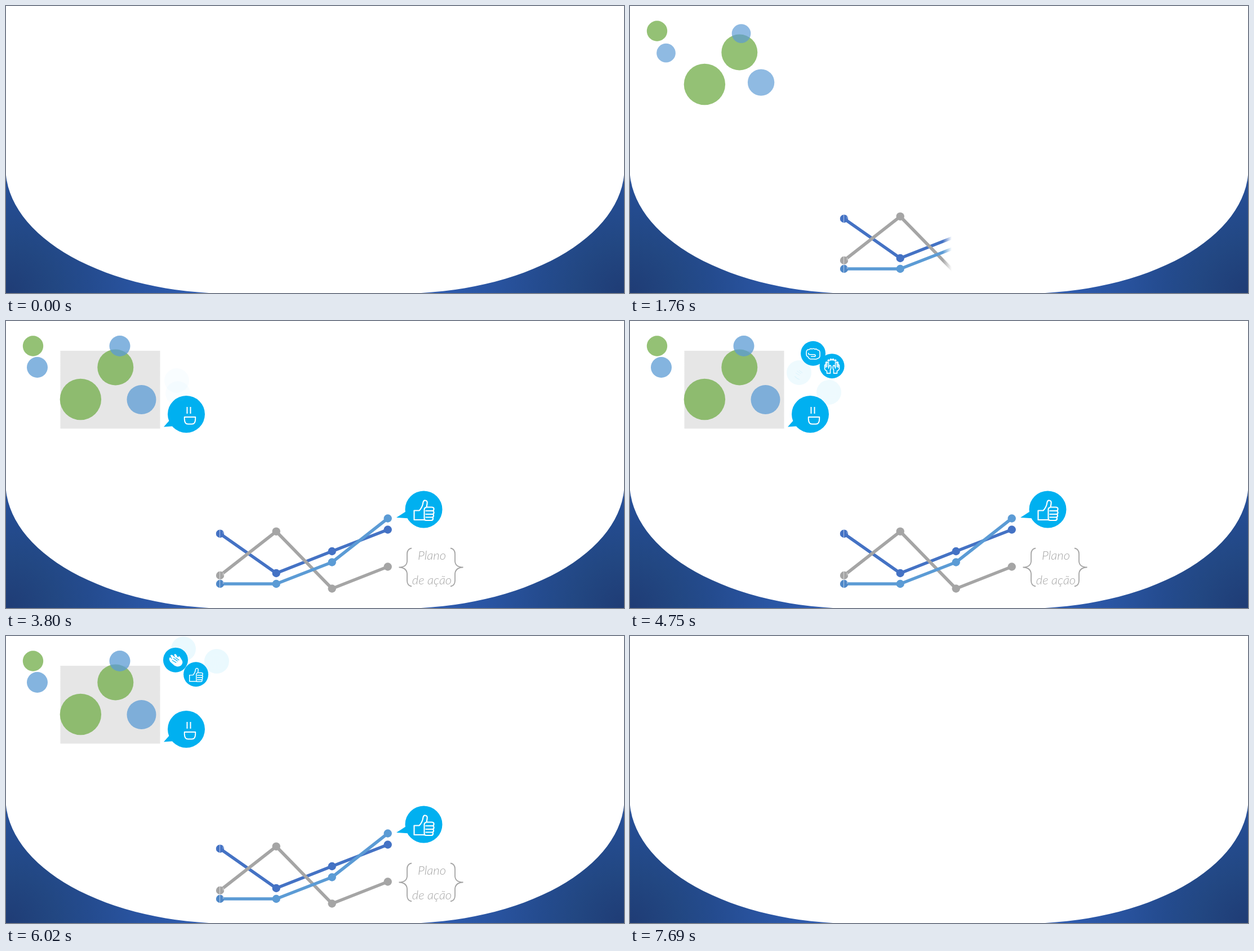
These frames come from a looping animation (1097x511 px, 8400 ms). An HTML page with a canvas:

```html
<!DOCTYPE html>
<html lang="pt">
<head>
<meta charset="utf-8">
<title>Plano de ação</title>
<style>
html, body { margin: 0; width: 100%; height: 100%; overflow: hidden; background: #fff; }
canvas { display: block; }
</style>
</head>
<body>
<canvas id="stage" width="1097" height="511"></canvas>
<script>
const W = 1097, H = 511, LOOP = 8400, STEP = 470;
const CYAN = '#00b0f0', GREY = '#a5a5a5', BLUE = '#4472c4', SKY = '#5b9bd5', GREEN = '#70ad47';
const ctx = document.getElementById('stage').getContext('2d');
const layer = document.createElement('canvas');
layer.width = W;
layer.height = H;
const lx = layer.getContext('2d');

const clamp = v => Math.min(1, Math.max(0, v));
const ramp = (t, start, end) => clamp((t - start) / (end - start));
const easeInOut = u => (1 - Math.cos(Math.PI * u)) / 2;

function disc(c, x, y, r, color) {
  c.fillStyle = color;
  c.beginPath();
  c.arc(x, y, r, 0, 7);
  c.fill();
}

function withState(fn) {
  ctx.save();
  fn();
  ctx.restore();
}

// Scale around a point and fade at the same rate
function zoomed(x, y, s, fn) {
  if (s <= 0) return;
  withState(() => {
    ctx.translate(x, y);
    ctx.scale(s, s);
    ctx.translate(-x, -y);
    ctx.globalAlpha *= s;
    fn();
  });
}

// ---- Background corners
function corner() {
  const g = ctx.createRadialGradient(0, H, 0, 0, H, 350);
  g.addColorStop(0, '#1f3c75');
  g.addColorStop(0.25, '#224782');
  g.addColorStop(0.42, '#244b8e');
  g.addColorStop(0.7, '#2a55a3');
  g.addColorStop(1, '#2e5cb1');
  ctx.fillStyle = g;
  ctx.beginPath();
  ctx.moveTo(-1, H + 1);
  ctx.lineTo(-0.6, 288.8);
  ctx.ellipse(399.4, 288.8, 400, 223.2, 0, Math.PI, Math.PI / 2, true);
  ctx.lineTo(399.4, H + 1);
  ctx.fill();
}

function background() {
  ctx.fillStyle = '#fff';
  ctx.fillRect(0, 0, W, H);
  corner();
  withState(() => {
    ctx.translate(W, 0);
    ctx.scale(-1, 1);
    corner();
  });
}

// ---- Bubble chart
const greens = [[48, 44.5, 18.2], [194.3, 82.5, 32], [132.4, 139.5, 36.7]];
const blues = [[55.5, 82.5, 18.5], [202, 44.5, 18.5], [240.5, 140, 26]];

function bubbles(list, color, cx, cy, s) {
  zoomed(cx, cy, s, () => {
    ctx.globalAlpha *= 0.75;
    for (const [x, y, r] of list) disc(ctx, x, y, r, color);
  });
}

// Grey panel opening from its middle line, with soft edges
function panel(p) {
  if (p <= 0) return;
  const soft = 9, mid = 122.3, h = p * (69.3 + soft);
  const g = ctx.createLinearGradient(0, mid - h, 0, mid + h);
  const k = Math.min(0.5, soft / (2 * h));
  g.addColorStop(0, 'rgba(230,230,230,0)');
  g.addColorStop(k, '#e6e6e6');
  g.addColorStop(1 - k, '#e6e6e6');
  g.addColorStop(1, 'rgba(230,230,230,0)');
  ctx.fillStyle = g;
  ctx.fillRect(96.5, 53, 177, 138.6);
}

// ---- Line chart
const cols = [380, 479.7, 578.7, 677.7];
const series = [
  [BLUE, [378.7, 449, 410, 371.5]],
  [GREY, [453, 374.7, 476.5, 437.5]],
  [SKY, [468, 468, 429.5, 351.5]]
];
const wipeFrom = [373, 380, 480, 579], wipeTo = [373, 387, 487, 586, 686], SOFT = 16;

function lineChart(t) {
  const step = Math.min(3, Math.floor((t - STEP) / STEP));
  if (step < 0) return;
  lx.globalCompositeOperation = 'source-over';
  lx.clearRect(0, 0, W, H);
  lx.lineWidth = 5.6;
  lx.lineJoin = 'round';
  for (const [color, ys] of series) {
    lx.strokeStyle = color;
    lx.beginPath();
    ys.forEach((y, i) => lx.lineTo(cols[i], y));
    lx.stroke();
    ys.forEach((y, i) => disc(lx, cols[i], y, 7.2, i === 0 && color === SKY ? '#4f88c8' : color));
    // seam in the first marker
    lx.fillStyle = 'rgba(255,255,255,.6)';
    lx.fillRect(379, ys[0] - 7, 1, 14);
    lx.fillStyle = 'rgba(255,255,255,.3)';
    lx.fillRect(384.5, ys[0] - 5, 2.5, 5);
  }
  const p = ramp(t, STEP * (step + 1), STEP * (step + 2));
  const prev = wipeTo[step], span = 200;
  const lead = wipeFrom[step] + p * (wipeTo[step + 1] - wipeFrom[step] + SOFT);
  const g = lx.createLinearGradient(prev, 0, prev + span, 0);
  const solid = Math.max(prev, lead - SOFT), end = Math.max(prev, lead);
  g.addColorStop(0, '#000');
  g.addColorStop((solid - prev) / span, `rgba(0,0,0,${clamp((lead - prev) / SOFT)})`);
  g.addColorStop((end - prev) / span, 'rgba(0,0,0,0)');
  lx.globalCompositeOperation = 'destination-in';
  lx.fillStyle = g;
  lx.fillRect(0, 0, W, H);
  ctx.drawImage(layer, 0, 0);
}

// ---- White icons, drawn around 0,0
const thumbPath = new Path2D('M-17 2H-8Q-2-4-1-13Q0-16.500 3-16Q7-15.500 6-10L5-4H14Q18-4 18-1' +
  'Q18 2.500 15 2.500Q18.500 3 18 6Q18 8.500 15 8.500Q18 9 17.500 11.500Q17.500 14 14 14' +
  'Q17 14.500 16.500 17Q16 19.500 13 19.500H4L0 18.500H-17Z' +
  'M5-4Q1-3 1 0V16Q1 19 4 19.500M15 2.500H3M15 8.500H3M14 14H3');
const fistPath = new Path2D('M-12-2Q-12-7-7-7Q-5-9-2-8Q1-9 3-7.500Q6-8.500 8-6Q12-6 12-1V4Q12 8 8 9' +
  'Q5 11 2 10H-5Q-8 9-9 6Q-12 5-12 1ZM-8-1Q-9 2-6 2H2Q4 2 4 4Q4 5.500 2 5.500H-4');
const armPath = new Path2D('M-3 13V7Q-1 4-2 0Q-3-2-5 0L-6 4V-6Q-8-8-9-5V-7Q-11-8-11-5V-2' +
  'Q-13-3-13 0V5Q-12 8-9 9V13ZM-9-5V2M-11-2V3');
const clapPath = new Path2D('M-10 1Q-12-6-8-7L-5-2-7-10Q-4-12-2-8L0-4 0-10Q3-12 4-7L5-3Q8-7 9-3' +
  'L11 4Q12 9 7 12Q1 14-4 10Z');
const clapLines = new Path2D('M-6-1L0 5M-3-4L3 3M1-4L6 2M-9 4Q-7 9-2 12');
const cupPath = new Path2D('M1.500-13V-1M7.500-13V-1M-3.200 5H16.200V9Q16 17.500 10 17.500H3Q-3 17.500-3.200 9Z');

function ink(path, width) {
  ctx.strokeStyle = '#fff';
  ctx.lineWidth = width;
  ctx.lineJoin = 'round';
  ctx.stroke(path);
}

const icons = {
  fist() { ink(fistPath, 1.6); },
  hands() {
    for (const side of [1, -1]) {
      withState(() => { ctx.scale(side, 1); ink(armPath, 1.6); });
    }
    for (const x of [-6, -2, 2, 6]) disc(ctx, x, -12 + Math.abs(x) / 3, 2, '#fff');
  },
  clap() {
    withState(() => {
      ctx.rotate(-0.25);
      ctx.fillStyle = '#fff';
      ctx.fill(clapPath);
      ctx.strokeStyle = CYAN;
      ctx.lineWidth = 1.2;
      ctx.stroke(clapLines);
    });
  },
  thumb() {
    ctx.scale(0.67, 0.67);
    ink(thumbPath, 2.2);
  }
};

// ---- Speech bubbles and note
function speech(x, y, tail, path, width) {
  withState(() => {
    ctx.translate(x, y);
    ctx.fillStyle = CYAN;
    ctx.beginPath();
    ctx.arc(0, 0, 33, 0, 7);
    ctx.moveTo(tail[0], tail[1]);
    ctx.lineTo(tail[2], tail[3]);
    ctx.lineTo(tail[4], tail[5]);
    ctx.closePath();
    ctx.fill();
    ink(path, width);
  });
}

const brace = new Path2D('M720 404.500Q712 406 712 415V428Q711 438.500 697.500 438.500Q711 439 712 450V462Q712 471 720 472.500');

function note() {
  ctx.strokeStyle = ctx.fillStyle = GREY;
  ctx.lineWidth = 1.8;
  ctx.stroke(brace);
  withState(() => {
    ctx.translate(1509, 0);
    ctx.scale(-1, 1);
    ctx.stroke(brace);
  });
  ctx.font = 'italic 300 22px Lato, sans-serif';
  ctx.textAlign = 'center';
  ctx.fillText('Plano', 756, 425);
  ctx.fillText('de ação', 756, 469);
}

function callouts(t) {
  const zoom = t < 4000 ? ramp(t, 2660, 3290) : 1 - ramp(t, 6290, 6970);
  const fade = t < 4000 ? ramp(t, 2820, 3290) : 1 - ramp(t, 6270, 6740);
  withState(() => {
    ctx.globalAlpha = fade;
    if (fade > 0) speech(320, 166, [-40, 22.5, -29, 10, -20, 21], cupPath, 2);
  });
  zoomed(741.5, 340, zoom, () => speech(741.5, 335.5, [-48.5, 14.5, -26, 0, -24, 16], thumbPath, 2.2));
  zoomed(755.5, 440, zoom, note);
}

// ---- Floating reactions: icon, start, end, bend of x, appear time, fade-out time
const reactions = [
  ['fist', 303, 106, 315, 23, 340, 3790, 5590],
  ['hands', 305, 129, 374, 45, 367, 3790, 5590],
  ['clap', 300, 92, 301, 34, 301, 4720, 6500],
  ['thumb', 353, 127, 323, 58, 376, 4720, 6500]
];

function floating(t) {
  for (const [icon, x0, y0, x1, y1, bend, start, out] of reactions) {
    const alpha = ramp(t, start, start + STEP) * (1 - ramp(t, out, out + STEP));
    if (alpha <= 0) continue;
    const e = easeInOut(ramp(t, start, start + 1740));
    const x = (1 - e) ** 2 * x0 + 2 * e * (1 - e) * bend + e * e * x1;
    withState(() => {
      ctx.globalAlpha = alpha;
      ctx.translate(x, y0 + (y1 - y0) * e);
      disc(ctx, 0, 0, 22, CYAN);
      icons[icon]();
    });
  }
}

function draw(t) {
  background();
  const left = 1 - ramp(t, 7170, 7690);
  if (left > 0) {
    withState(() => {
      ctx.globalAlpha = left;
      panel(ramp(t, 2415, 2885));
      bubbles(greens, GREEN, 131, 101, ramp(t, 490, 1155));
      bubbles(blues, SKY, 151.5, 96, ramp(t, 1155, 1820));
      lineChart(t);
    });
  }
  callouts(t);
  floating(t);
}

function tick() {
  draw(performance.now() % LOOP);
  requestAnimationFrame(tick);
}
tick();
</script>
</body>
</html>
```
